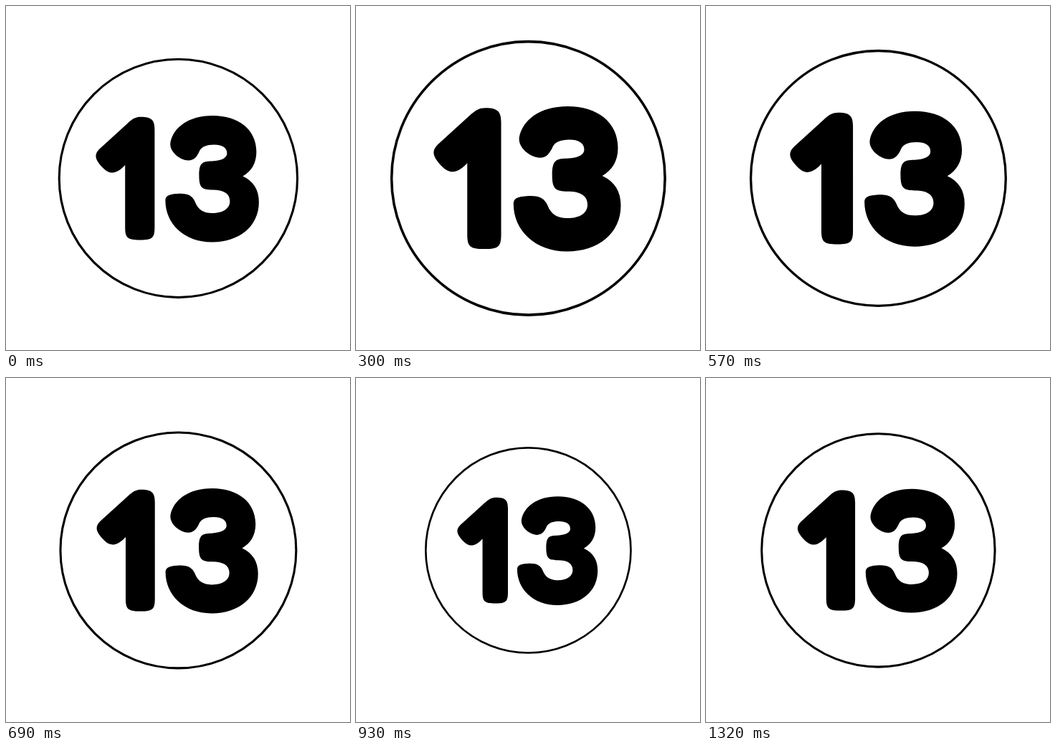
These frames come from a looping animation (480 px wide and 480 px high, 1.35 s). An HTML page:

```html
<!DOCTYPE html>
<html lang="en">
<head>
<meta charset="utf-8">
<title>Pulsing 13</title>
<style>
  html, body { margin: 0; width: 100%; height: 100%; overflow: hidden; background: #fff; }
  svg { display: block; width: 100%; height: 100%; }
</style>
</head>
<body>
<svg viewBox="-240.4 -240.4 480 480" role="img" aria-label="13">
  <g id="badge">
    <circle r="166.2" fill="#fff" stroke="#000" stroke-width="3.1"/>
    <g transform="translate(-240 -240)">
      <path d="M165.8 221.5C161 226.5 155 231.5 149 232C143 232.5 138 229 133 223.5
        C128 218 125 213 125 209C125 205.5 126.5 202.5 130 199L169 163.5
        C176 157 180.5 154.4 188 154.4C203 154.4 207 159 207 172V308
        C207 323 204 326 187 326C169 326 165.8 323 165.8 308Z"/>
      <path d="M229 190C233 170 253 152.6 288 152.6C324 152.6 349 172 349 203C349 219 342 230 330 237
        C345 244 352.5 256 352.5 273C352.5 307 325 329 287 329C248 329 222 303 222 271
        C222 265 226 262.3 238 261.6C253 260.5 259.5 264 263.5 273C267.5 284 276 288.5 287 288.5
        C303 288.5 312 282 312 272C312 261 303 256 288 256C273 256 269 253 269 236
        C269 219 273 216 287 216C302 215 308 211 308 205C308 197 301 193 290 193
        C279 193 273 196 270 201C266 210 262 215 254 215C243 215 227 203 229 190Z"/>
    </g>
  </g>
</svg>
<script>
  const LOOP = 1350, STEP = 30;
  const badge = document.getElementById('badge');

  function draw() {
    const t = Math.floor(performance.now() % LOOP / STEP) * STEP;
    const scale = 1 + 0.15 * Math.sin(2 * Math.PI * t / LOOP);
    badge.setAttribute('transform', `scale(${scale})`);
    requestAnimationFrame(draw);
  }
  draw();
</script>
</body>
</html>
```
